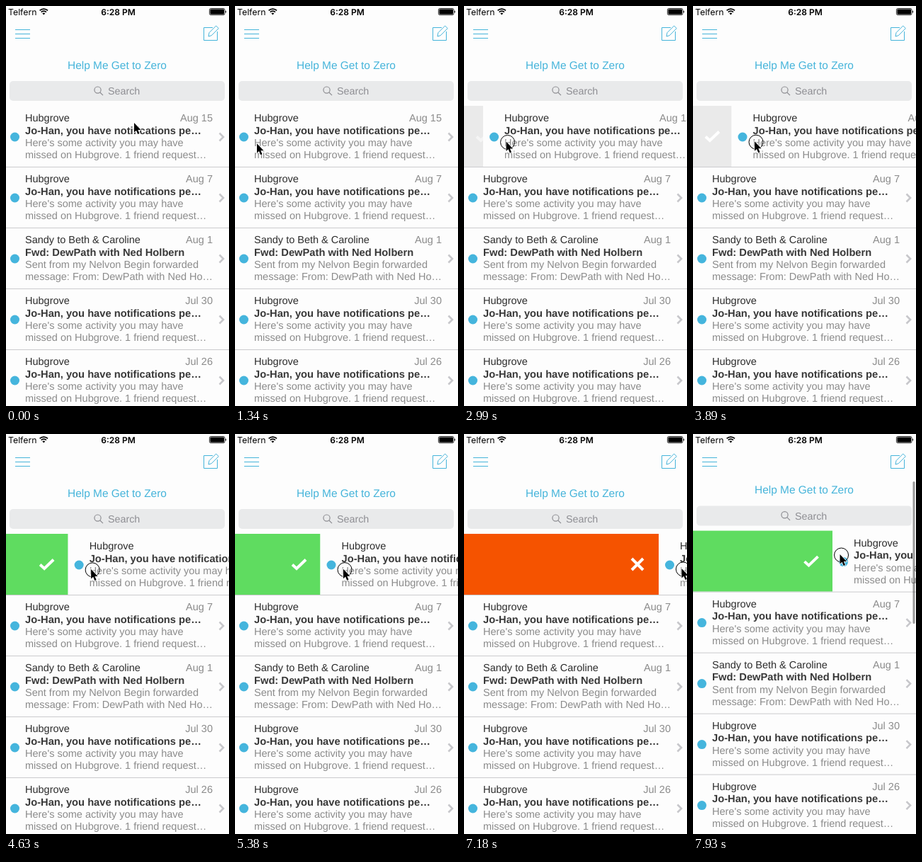
These frames come from a looping animation (315x565 px, 8 s). An HTML page:

```html
<!DOCTYPE html>
<html lang="en">
<head>
<meta charset="utf-8">
<title>Swipe a mail row</title>
<style>
  html, body { margin: 0; width: 100%; height: 100%; overflow: hidden; background: #fdfdfd; }
  svg { display: block; width: 315px; height: 565px; text-rendering: geometricPrecision; }
  text { font: 14.5px "Liberation Sans", Arial, sans-serif; fill: #8b8b8b; }
  .from { fill: #2c2c2c; }
  .subject { font-size: 14.7px; font-weight: bold; fill: #383838; }
  .date { text-anchor: end; }
  .help { font-size: 15.45px; fill: #45b4da; text-anchor: middle; }
  .search { font-size: 14.3px; fill: #8e8e93; }
  .status { font: 12.3px Inter, Roboto, sans-serif; fill: #000; }
  .clock { font-size: 12px; font-weight: 600; text-anchor: middle; }
  .line { fill: none; stroke: #45b4da; }
  .icon { fill: none; stroke: #fff; stroke-width: 4; }
</style>
</head>
<body>
<svg viewBox="0 0 315 565">
  <g id="page">
    <text class="help" x="157" y="88.5">Help Me Get to Zero</text>
    <rect x="5" y="106" width="304" height="28" rx="5" fill="#e9eaeb"/>
    <g fill="none" stroke="#8e8e93" stroke-width="1.2">
      <circle cx="129.5" cy="118.6" r="4.6"/>
      <path d="M132.8 122L137 126.2"/>
    </g>
    <text class="search" x="144" y="125">Search</text>
    <g transform="translate(0 141)">
      <rect id="back" width="0" height="86"/>
      <path id="check" class="icon" d="M-9.5 .5L-3.5 6L9.5 -6.5"/>
      <path id="cross" class="icon" d="M-8 -8L8 8M8 -8L-8 8"/>
      <rect id="cover" width="315" height="86" fill="#fdfdfd"/>
    </g>
    <g id="rows"></g>
  </g>

  <rect width="315" height="62" fill="#fdfdfd"/>
  <text class="status" x="3" y="12.5">Telfern</text>
  <g fill="none" stroke="#000" stroke-width="1.7">
    <path d="M47.6 6.4a8.1 8.1 0 0 1 11.4 0M49.7 8.6a5.1 5.1 0 0 1 7.2 0"/>
    <path d="M53.3 12.4l-1.9-1.9a2.7 2.7 0 0 1 3.8 0z" fill="#000" stroke="none"/>
  </g>
  <text class="status clock" x="158.5" y="12.5">6:28 PM</text>
  <rect x="287.4" y="3.5" width="21.6" height="9.2" rx="2" fill="none" stroke="#000" stroke-width=".8"/>
  <rect x="288.4" y="4.5" width="19.6" height="7.2" rx="1"/>
  <path d="M310 6.3q2.4 1.8 0 3.6z"/>
  <path class="line" d="M13 33.5H34M13 39.5H34M13 45.5H34"/>
  <path class="line" d="M292 30.5H279.5V48.5H298.5V36M296.7 28L300.3 31.6L290.2 41.7L286 43L287 37.7Z"/>

  <rect id="bar" x="310.5" y="67" width="3" height="201" rx="1.5" opacity="0"/>
  <g id="cursor">
    <circle id="ring" cx="2" cy="1" r="10" fill="none" stroke="#000"/>
    <path d="M0 0V13.6L3 10.8L5.2 16L7.5 15L5.3 10H9.5Z" stroke="#fff" stroke-width="1.4" paint-order="stroke"/>
  </g>
</svg>
<script>
const $ = id => document.getElementById(id);
const set = (el, attrs) => { for (const k in attrs) el.setAttribute(k, attrs[k]); };
const clamp = v => Math.min(1, Math.max(0, v));

const LOOP = 8000, TICK = 149.62; // the screen refreshes once per tick
const ROW_TOP = 141, ROW_H = 86;
const PRESS = 1640, GREEN_AT = 56, RED_AT = 236;

const social = date => ["Hubgrove", date, "Jo-Han, you have notifications pe…",
  "Here's some activity you may have", "missed on Hubgrove. 1 friend request…"];
const mails = [
  social("Aug 15"),
  social("Aug 7"),
  ["Sandy to Beth & Caroline", "Aug 1", "Fwd: DewPath with Ned Holbern",
    "Sent from my Nelvon Begin forwarded", "message: From: DewPath with Ned Ho…"],
  social("Jul 30"),
  social("Jul 26"),
];

const label = (cls, x, y, s) =>
  `<text class="${cls}" x="${x}" y="${y}">${s.replace("&", "&amp;")}</text>`;

$("rows").innerHTML = mails.map(([from, date, subject, a, b], i) => `
  <g transform="translate(0 ${ROW_TOP + i * ROW_H})">
    <rect y="86" width="315" height="1" fill="#cbcbce"/>
    <g class="mail">
      <circle cx="12.5" cy="44" r="6.5" fill="#45b5dd"/>
      ${label("from", 27, 22, from)}${label("date", 292, 22, date)}
      ${label("subject", 27, 39.5, subject)}
      ${label("body", 27, 57, a)}${label("body", 27, 74, b)}
      <path d="M301.5 38.5L307 44L301.5 49.5" fill="none" stroke="#c7c7cb" stroke-width="2.6"/>
    </g>
  </g>`).join("");
const firstMail = document.querySelector(".mail");

// Key points [time, value...]; the pointer also rides along with the dragged row.
const hand = [[0, 181, 165], [600, 241, 290], [750, 215, 291], [900, 215, 291],
  [1340, 31, 194], [PRESS, 29.5, 201], [2990, 29.5, 191.5], [7180, 29.5, 190], [7930, 7.5, 170]];
const rise = [[0, 0], [1800, 0], [2990, 27], [3890, 54.5], [5380, 120.5], [5540, 120.5],
  [6730, 243], [7180, 275]];

function at(keys, t) {
  const i = keys.findIndex(k => k[0] > t);
  if (i < 0) return keys[keys.length - 1].slice(1);
  const a = keys[i - 1], b = keys[i], p = (t - a[0]) / (b[0] - a[0]);
  return a.slice(1).map((v, j) => v + (b[j + 1] - v) * p);
}

function draw(time) {
  const t = Math.floor((time + 10) / TICK) * TICK;
  const fall = clamp((t - 7180) / 750);
  const s = at(rise, t)[0] - 78 * fall ** 2;
  const shift = s > 0 ? s + 3 : 0;
  const dy = -4.4 * clamp((t - 7640) / 290);
  const [x, y] = at(hand, t);
  const red = s > RED_AT;
  const icon = `translate(${Math.max(27.3, s - 30)} 43)`;

  set($("back"), { width: s, fill: red ? "#f55300" : s > GREEN_AT ? "#5fdc60" : "#eaeaea" });
  set($("check"), { transform: icon, opacity: red ? 0 : clamp(s / 54) });
  set($("cross"), { transform: icon, opacity: red ? 1 : 0 });
  set($("cover"), { x: s });
  set(firstMail, { transform: `translate(${shift} 0)` });
  set($("page"), { transform: `translate(0 ${dy})` });
  set($("bar"), { opacity: dy < 0 ? 0.4 : 0 });
  set($("cursor"), { transform: `translate(${x + shift} ${y})` });
  set($("ring"), { opacity: t >= PRESS ? 1 : 0 });
}

const start = performance.now();
function loop() {
  draw((performance.now() - start) % LOOP);
  requestAnimationFrame(loop);
}
loop();
</script>
</body>
</html>
```
